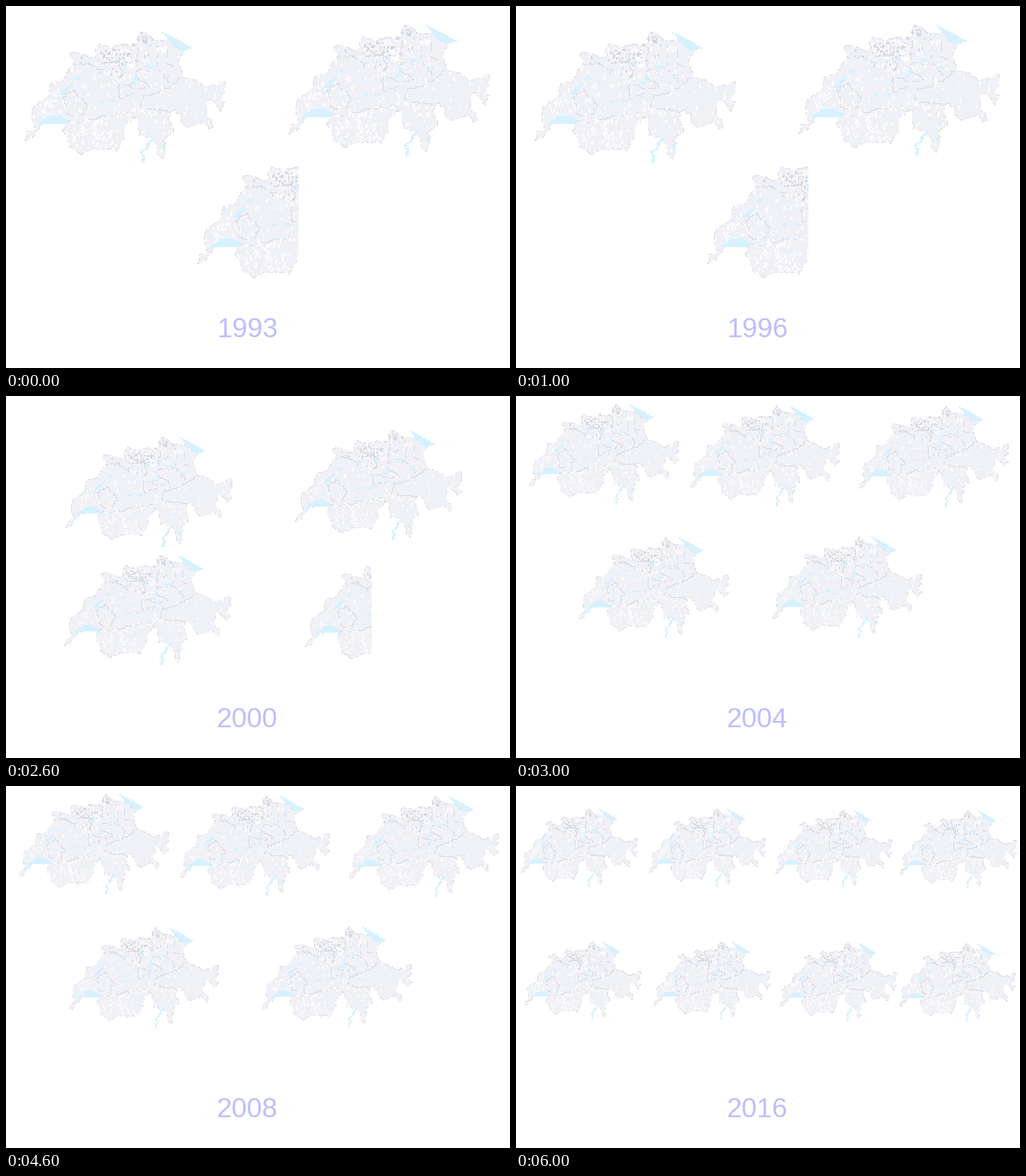
Recreate the animation shown at these times as a matplotlib script. Size 882 by 635 pixels, loop 7 s.

```python
import math
from itertools import pairwise

import numpy as np
import matplotlib.pyplot as plt
from matplotlib.animation import FuncAnimation
from matplotlib.colors import to_rgb
from matplotlib.path import Path

W, H, DPI = 882, 635, 64
LEFT, TOP, MAP_W, MAP_H = 33, 42, 353, 234
EMPTY, LAND, RIVER, EDGE, TOWN, LAKE = range(6)
COLORS = np.array([to_rgb(c) for c in ("white", "#f0f1f6", "white", "#d3d4db",
                                       "#d6d7de", "#d6f1ff")])

# Country outline, clockwise from the western tip
NORTH = [(34, 234), (37, 221), (49, 218), (44, 193), (48, 179), (72, 160),
         (77, 136), (96, 132), (120, 98), (108, 88), (114, 80), (130, 80),
         (145, 92), (157, 87), (156, 73), (165, 66), (185, 74), (198, 67),
         (232, 67), (228, 54), (240, 44), (260, 60), (284, 60), (312, 80),
         (302, 100), (312, 124), (328, 129), (347, 140), (367, 140), (375, 130)]
SOUTH = [(384, 133), (383, 150), (375, 166), (386, 173), (376, 183), (358, 165),
         (352, 170), (349, 192), (361, 202), (360, 218), (345, 204), (318, 213),
         (307, 207), (306, 190), (291, 184), (286, 190), (292, 220), (277, 234),
         (280, 243), (275, 269), (264, 263), (268, 248), (250, 231), (234, 228),
         (229, 195), (211, 206), (206, 232), (193, 253), (155, 250), (132, 262),
         (113, 246), (105, 230), (100, 214), (107, 203), (66, 205), (44, 232)]

BIG_LAKES = [
    [(56, 217), (57, 205), (75, 192), (92, 191), (108, 200), (107, 206), (66, 206)],
    [(270, 43), (300, 58), (327, 74), (308, 80), (283, 61), (282, 55)],
    [(92, 157), (100, 146), (121, 133), (104, 155)],
]
THIN_LAKES = [
    [(257, 230), (248, 238), (245, 248), (235, 256), (239, 264), (235, 276)],
    [(279, 241), (269, 247)],
]
# center and radii
SMALL_LAKES = [(126, 127, 5, 3), (222, 136, 6, 3), (228, 126, 3, 7),
               (253, 107, 9, 3), (167, 167, 5, 3), (189, 167, 5, 2),
               (280, 122, 7, 2), (206, 104, 3, 5)]

CANTONS = [
    [(107, 204), (131, 205), (160, 197), (214, 186), (228, 197)],
    [(118, 148), (102, 160), (110, 190), (132, 194), (142, 176), (118, 148)],
    [(118, 105), (145, 100), (165, 113), (185, 100), (170, 84)],
    [(190, 78), (205, 112), (197, 136), (200, 160), (222, 160), (232, 144)],
    [(235, 68), (228, 90), (232, 115), (264, 112), (268, 84), (262, 64)],
    [(232, 126), (254, 142), (232, 146), (206, 140)],
    [(308, 127), (272, 150), (240, 158), (236, 180), (288, 186)],
    [(268, 112), (290, 138)],
    [(284, 76), (285, 102), (301, 105)],
]

# map scale, block size, map corners, right edge of the last map
THREE = (1, 3, [(33, 42), (495, 30), (335, 258)], 512)
FOUR = (.832, 2, [(104, 70), (506, 58), (101, 277), (523, 279)], 640)
FIVE = (.75, 3, [(21, 14), (302, 17), (598, 18), (108, 248), (446, 247)], W)
SIX = (.75, 1, [(14, 37), (291, 37), (567, 37),
                (14, 248), (287, 246), (570, 246)], W)
EIGHT = (.584, 2, [(7, 40), (231, 40), (452, 42), (670, 43),
                   (13, 273), (239, 273), (460, 275), (668, 276)], W)
LAYOUTS = [THREE, THREE, FOUR, FIVE, FIVE, SIX, EIGHT]


def year(i):
    return max(1993, 1992 + 4 * i)


def inside(points, gx, gy):
    flat = np.column_stack([gx.ravel(), gy.ravel()])
    closed = list(points) + [points[0]]
    return Path(closed).contains_points(flat).reshape(gx.shape)


def wander(points, rng, wobble=1.1):
    """Resample a line every few pixels with a small wobble."""
    out = []
    for (x0, y0), (x1, y1) in pairwise(points):
        n = max(2, int(math.hypot(x1 - x0, y1 - y0) / 5))
        for t in np.arange(n) / n:
            dx, dy = rng.normal(0, wobble, 2)
            out.append((x0 + (x1 - x0) * t + dx, y0 + (y1 - y0) * t + dy))
    return out + [points[-1]]


def trace(grid, points, scale, block, code, width=1):
    """Draw a stair-stepped line over land only."""
    snapped = [(int((x - LEFT) * scale / block) * block,
                int((y - TOP) * scale / block) * block) for x, y in points]
    for (x0, y0), (x1, y1) in pairwise(snapped):
        for xs, ys in (((x0, x0), (y0, y1)), ((x0, x1), (y1, y1))):
            part = grid[max(min(ys), 0):max(max(ys), 0) + 1,
                        max(min(xs), 0):max(max(xs), 0) + width]
            part[part != EMPTY] = code


def add_rivers(grid, scale, block, rng):
    corner = np.array((LEFT, TOP))
    spots = [rng.uniform(corner, corner + (MAP_W, MAP_H), (350, 2))]
    for center, count in (((208, 90), 65), ((160, 225), 50), ((75, 172), 22)):
        spots.append(rng.normal(center, (22, 15), (count, 2)))
    for x, y in np.concatenate(spots):
        path = [(x, y)]
        for _ in range(rng.integers(1, 4)):
            x, y = x + rng.normal(0, 1.6), y + rng.uniform(1, 4)
            path.append((x, y))
        trace(grid, path, scale, min(block, 2), RIVER, 2 if scale == 1 else 1)


def add_borders(grid, scale, block, rng):
    for line in CANTONS:
        for a, b in pairwise(wander(line, rng)):
            pick = rng.random()
            if pick < .85:
                trace(grid, [a, b], scale, block, EDGE if pick < .7 else RIVER)


def add_towns(grid, scale, rng):
    spots = np.concatenate([rng.normal((190, 86), (26, 14), (70, 2)),
                            rng.normal((241, 54), (9, 6), (16, 2))])
    for x, y in spots:
        w, h = rng.uniform(1.5, 5, 2) * scale
        c, r = int((x - LEFT) * scale), max(int((y - TOP) * scale), 0)
        part = grid[r:r + round(h), c:c + round(w)]
        part[part != EMPTY] = TOWN


def add_coast(grid, land, rng):
    p = np.pad(land, 1)
    core = p[:-2, 1:-1] & p[2:, 1:-1] & p[1:-1, :-2] & p[1:-1, 2:]
    h, w = grid.shape
    dashes = rng.random((h // 4 + 1, w // 4 + 1)) < .45
    dashes = np.kron(dashes, np.ones((4, 4), bool))[:h, :w]
    grid[land & ~core & dashes] = EDGE


def add_lakes(grid, gx, gy):
    ribbons = [line + [(x + 5, y + 1) for x, y in line[::-1]]
               for line in THIN_LAKES]
    for lake in BIG_LAKES + ribbons:
        grid[inside(lake, gx, gy)] = LAKE
    for x, y, rx, ry in SMALL_LAKES:
        grid[((gx - x) / rx) ** 2 + ((gy - y) / ry) ** 2 < 1] = LAKE


def draw_map(scale, block):
    rng = np.random.default_rng(11)
    h, w = math.ceil(MAP_H * scale) + 1, math.ceil(MAP_W * scale) + 1
    rows, cols = np.mgrid[:h, :w]
    gx = (cols // block + .5) * block / scale + LEFT
    gy = (rows // block + .5) * block / scale + TOP
    land = inside(wander(NORTH + SOUTH, rng, 1.3), gx, gy)
    grid = np.where(land, LAND, EMPTY)
    add_rivers(grid, scale, block, rng)
    add_borders(grid, scale, block, rng)
    add_towns(grid, scale, rng)
    add_coast(grid, land, rng)
    add_lakes(grid, gx, gy)
    return grid


def draw_stage(scale, block, corners, limit):
    stage = np.full((H, W), EMPTY)
    tile = draw_map(scale, block)
    for i, (x, y) in enumerate(corners):
        right = limit if i == len(corners) - 1 else W
        spot = stage[y:y + tile.shape[0], x:min(x + tile.shape[1], right)]
        part = tile[:spot.shape[0], :spot.shape[1]]
        spot[part != EMPTY] = part[part != EMPTY]
    return COLORS[stage]


stages = [draw_stage(*layout) for layout in LAYOUTS]

fig = plt.figure(figsize=(W / DPI, H / DPI), dpi=DPI, facecolor="white")
ax = fig.add_axes([0, 0, 1, 1])
ax.axis("off")
picture = ax.imshow(stages[0], extent=(0, W, H, 0), aspect="auto",
                    interpolation="nearest")
label = ax.text(369, 581, "", color="#bebeff", family="Liberation Sans",
                size=48 * 72 / DPI, ha="left", va="baseline")


def update(i):
    picture.set_data(stages[i])
    label.set_text(str(year(i)))
    return picture, label


anim = FuncAnimation(fig, update, frames=len(LAYOUTS), interval=1000,
                     repeat=True, repeat_delay=0)
plt.show()
```
